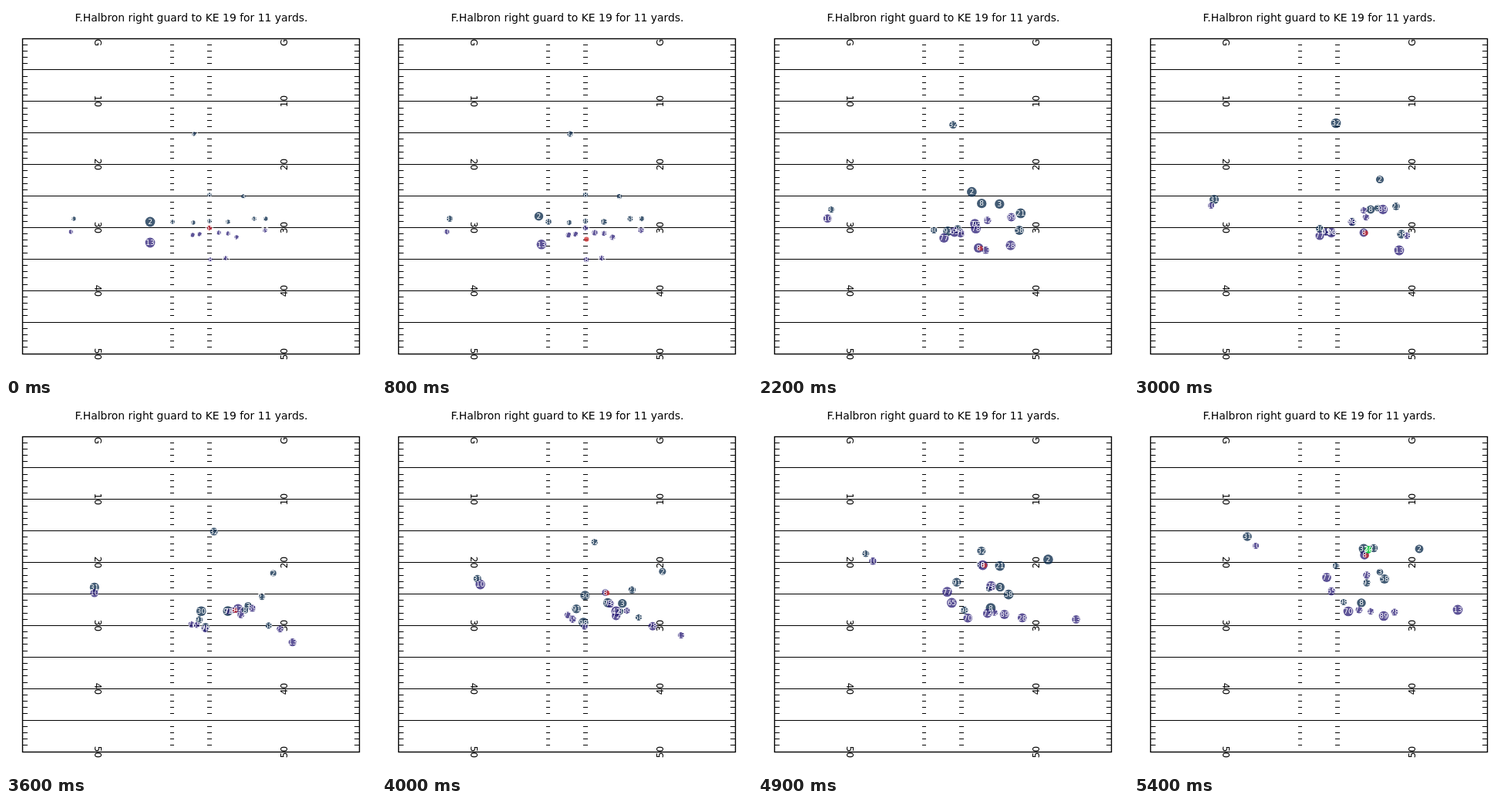
An HTML page with a canvas for the animation above (5500 ms loop, 480 by 480 pixels).

```html
<!DOCTYPE html>
<html lang="en">
<head>
<meta charset="utf-8">
<title>Play tracking</title>
<style>
  html, body { margin: 0; height: 100%; overflow: hidden; background: #fff; }
  canvas { display: block; }
</style>
</head>
<body>
<canvas id="stage" width="480" height="480"></canvas>
<script>
const ctx = document.getElementById('stage').getContext('2d');
const LOOP = 5500, STEP = 100, SNAP = 800;
const DEFENSE = 'rgba(0,34,68,.74)', OFFENSE = 'rgba(36,23,115,.74)';
const TACKLE = '#22d04a', BALL = 'rgba(205,40,40,.75)';
const FONT = '"DejaVu Sans", sans-serif';
const players = [];

// A route runs through a lineup spot, a mid-play spot, a pursuit spot and a finish.
function add(color, number, ...route) {
  const inMotion = number === 2 || number === 13;
  const times = [inMotion ? 0 : SNAP, 3000, 4400, 5400];
  const player = { color, number, route, times, inMotion };
  players.push(player);
  return player;
}

add(DEFENSE, 31, [88, 276], [104, 251], [132, 214], [147, 172]);
add(DEFENSE, 2, [187, 280], [319, 225], [376, 213], [370, 188]);
const tackler = add(DEFENSE, 30, [216, 280], [241, 289], [274, 229], [304, 189]);
add(DEFENSE, 91, [243, 281], [249, 293], [254, 251], [262, 210]);
add(DEFENSE, 98, [264, 279], [257, 294], [264, 277], [272, 257]);
add(DEFENSE, 93, [288, 280], [283, 280], [297, 248], [302, 232]);
add(DEFENSE, 58, [322, 276], [347, 296], [327, 265], [325, 227]);
add(DEFENSE, 21, [337, 276], [340, 260], [318, 230], [311, 187]);
add(DEFENSE, 3, [308, 247], [316, 262], [311, 253], [319, 218]);
add(DEFENSE, 8, [264, 245], [307, 264], [307, 269], [295, 258]);
add(DEFENSE, 32, [244, 166], [262, 152], [282, 189], [298, 188]);

add(OFFENSE, 10, [84, 293], [100, 259], [139, 222], [158, 184]);
add(OFFENSE, 13, [187, 307], [344, 317], [402, 291], [420, 267]);
add(OFFENSE, 77, [242, 297], [241, 298], [242, 261], [250, 225]);
add(OFFENSE, 72, [251, 296], [301, 274], [302, 275], [292, 267]);
add(OFFENSE, 65, [264, 288], [249, 293], [248, 271], [256, 243]);
add(OFFENSE, 70, [276, 294], [256, 294], [267, 285], [278, 269]);
add(OFFENSE, 78, [288, 295], [282, 280], [301, 249], [302, 222]);
add(OFFENSE, 42, [299, 300], [298, 265], [306, 271], [307, 269]);
add(OFFENSE, 89, [336, 291], [323, 264], [317, 271], [324, 275]);
add(OFFENSE, 28, [285, 327], [354, 298], [347, 284], [338, 270]);
const carrier = add(OFFENSE, 8, [265, 329], [298, 294], [287, 225], [299, 196]);

const mix = (a, b, k) => a + (b - a) * k;

function smooth(from, to, t) {
  const k = Math.min(1, Math.max(0, (t - from) / (to - from)));
  return k * k * (3 - 2 * k);
}

// Smooth curve through the route, starting from rest.
function locate({ route, times, number, inMotion }, t) {
  const last = times.length - 1;
  let i = 0;
  while (i < last - 1 && t >= times[i + 1]) i++;
  const span = times[i + 1] - times[i], k = Math.max(0, (t - times[i]) / span);
  const curve = axis => {
    const slope = n => {
      if (n === 0) return 0;
      const a = n - 1, b = Math.min(last, n + 1);
      return (route[b][axis] - route[a][axis]) / (times[b] - times[a]) * span;
    };
    return mix(route[i][axis], route[i + 1][axis], smooth(0, 1, k))
      + k * (1 - k) * ((1 - k) * slope(i) - k * slope(i + 1));
  };
  const pulse = 5.2 + 1.2 * Math.sin(t / 400 + number);
  const r = mix(inMotion ? 6.4 : 2.8, pulse, smooth(400, 1500, t));
  return { x: curve(0), y: curve(1), r };
}

function dot({ x, y, r }, color) {
  ctx.fillStyle = color;
  ctx.beginPath();
  ctx.arc(x, y, r, 0, Math.PI * 2);
  ctx.fill();
}

function label(text, x, y, size, color, angle = 0) {
  ctx.save();
  ctx.translate(x, y);
  ctx.rotate(angle);
  ctx.font = `${size}px ${FONT}`;
  ctx.fillStyle = color;
  ctx.fillText(text, 0, size * 0.365);
  ctx.restore();
}

function drawField() {
  const yardY = yard => Math.round(41.6 + yard * 8.1785) + 0.5;
  ctx.strokeStyle = '#000';
  ctx.lineWidth = 1.1;
  ctx.beginPath();
  for (let yard = 1; yard < 50; yard++) {
    const y = yardY(yard);
    const spans = yard % 5 ? [[22, 28], [213, 218], [261, 267], [452, 458]] : [[22, 458]];
    for (const [a, b] of spans) { ctx.moveTo(a, y); ctx.lineTo(b, y); }
  }
  ctx.stroke();
  ctx.lineWidth = 1.4;
  ctx.strokeRect(21.5, yardY(0), 437, yardY(50) - yardY(0));
  for (let yard = 0; yard <= 50; yard += 10) {
    const text = yard || 'G', y = yard ? yardY(yard) : 47.3;
    label(text, 119.5, y, 12, '#000', Math.PI / 2);
    label(text, 360.5, y, 12, '#000', -Math.PI / 2);
  }
  label('F.Halbron right guard to KE 19 for 11 yards.', 240.5, 15, 13.9, '#000');
}

function draw(now) {
  const t = Math.floor(now % LOOP / STEP) * STEP;
  ctx.fillStyle = '#fff';
  ctx.fillRect(0, 0, 480, 480);
  ctx.textAlign = 'center';
  drawField();

  for (const p of players) Object.assign(p, locate(p, t));
  for (const p of players) dot(p, p.color);

  const thrown = smooth(SNAP - 200, SNAP + 300, t);
  dot({ x: mix(264, carrier.x + 2.5, thrown), y: mix(288, carrier.y + 0.5, thrown), r: 3.2 }, BALL);
  if (t === LOOP - STEP) dot(tackler, TACKLE);

  for (const p of players) label(p.number, p.x, p.y, 9, '#fff');
  requestAnimationFrame(draw);
}
requestAnimationFrame(draw);
</script>
</body>
</html>
```
